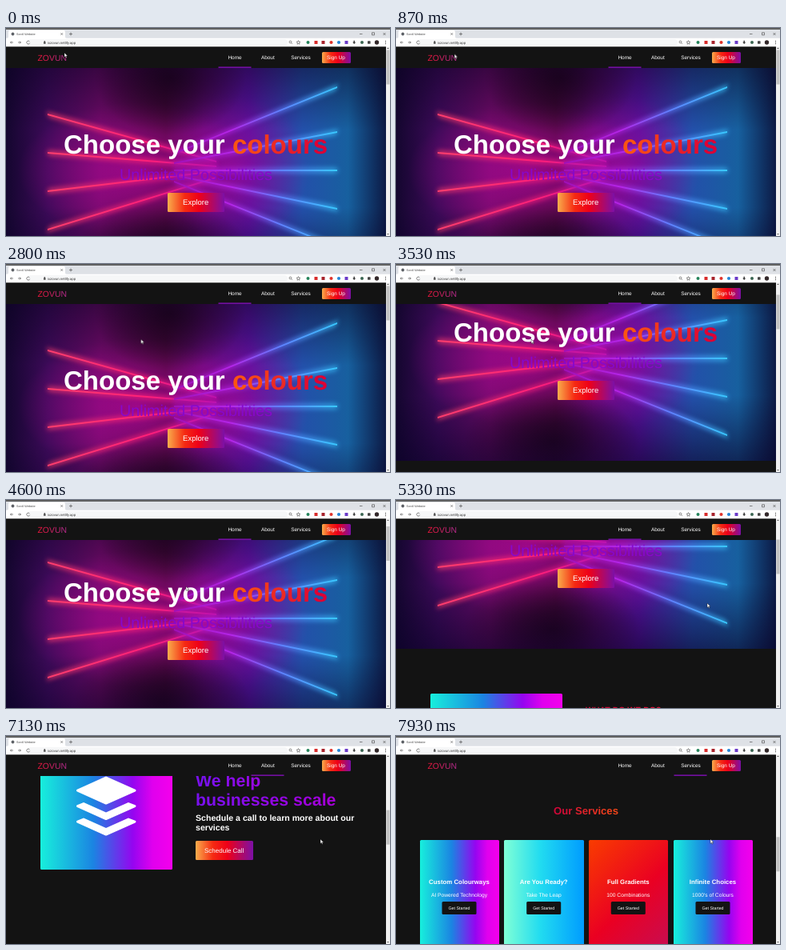
Write an HTML page that moves like this. It is 480 px wide and 260 px high and loops after 8000 ms.

```html
<!DOCTYPE html>
<html lang="en">
<head>
<meta charset="utf-8">
<title>Scroll Website</title>
<style>
  @property --scroll { syntax: "<number>"; inherits: true; initial-value: 0; }
  html, body { margin: 0; width: 100%; height: 100%; overflow: hidden; background: #131313; }
  div, i, svg { position: absolute; display: block; }
  svg { left: 0; top: 0; }
  text { font-family: "Liberation Sans", Arial, sans-serif; fill: #fff; text-rendering: geometricPrecision; }
  .bold { font-weight: 700; }
  .mid { text-anchor: middle; }

  #stage { width: 480px; height: 260px; overflow: hidden; animation: scroll 8s linear infinite; }
  #page { width: 475px; height: 860px; transform: translateY(calc(var(--scroll) * -1px)); }
  #thumb { transform: translateY(calc(var(--scroll) * .183px)); }
  #active { animation: section 8s step-end infinite; }
  #pointer { animation: pointer 8s ease-in-out infinite; }

  #hero {
    top: 50px; width: 475px; height: 256px; overflow: hidden;
    background:
      linear-gradient(#0a022080, #0a022000 30%, #0a022000 68%, #0a022899),
      radial-gradient(95px 72px at 205px 12px, #200318d9, #20031800),
      radial-gradient(110px 66px at 195px 232px, #200318d9, #20031800),
      radial-gradient(95px 90px at 285px 125px, #b4089a7c, #a0089000),
      radial-gradient(150px 85px at 165px 128px, #b4089abf, #a0089000),
      linear-gradient(90deg, #14062f, #3c0a58 11%, #6d0a66 25%, #4a083f 42%, #620b7c 52%,
        #56129f 64%, #2350aa 78%, #17609f 90%, #0c1a45);
  }
  #hero i {
    top: calc(var(--y) * 1px - 50.8px); height: 1.7px; transform-origin: 0 50%;
    transform: skewY(atan2(var(--rise), var(--run)));
  }
  #hero i::before, #hero i::after { content: ""; position: absolute; inset: 0; background: var(--glow); }
  #hero i::before { inset: -2px 0; filter: blur(3px); opacity: .75; }
  .red { --run: 211; left: 52px; width: 211px; --glow: linear-gradient(90deg, #ff3e6c, #ff1f78 60%, #c010a8); }
  .blue { --run: 204; left: 210px; width: 204px; --glow: linear-gradient(90deg, #a010b8, #b425e8 35%, #5f80ff 65%, #38c8ff); }

  .button, .card { border-radius: 1.5px; }
  .button { width: 71.5px; height: 24px; background: linear-gradient(90deg, #f9ad4c, #f52a12 30%, #ee0018 55%, #7c10a6); }
  .card { top: 670px; width: 99.5px; height: 160px; }
  .rainbow { background: linear-gradient(90deg, #17efdc, #1b84e2 40%, #9505f0 70%, #e000ee 85%, #f400ec); }
  .aqua { background: linear-gradient(90deg, #80ffd6, #22dcf0 45%, #009cff); }
  .lava { background: linear-gradient(135deg, #f93c00, #ea0022 50%, #c0105c); }

  @keyframes scroll {
    0%, 36.9% { --scroll: 0; animation-timing-function: ease-in-out; }
    41.6%, 50% { --scroll: 60; animation-timing-function: ease-in-out; }
    53.8%, 59.4% { --scroll: 30; animation-timing-function: ease-in-out; }
    65.6%, 68.8% { --scroll: 120; animation-timing-function: ease-in-out; }
    75%, 80% { --scroll: 210; animation-timing-function: ease-in; }
    86.2% { --scroll: 300; }
    92.5% { --scroll: 420; animation-timing-function: ease-out; }
    98.7%, 100% { --scroll: 540; }
  }
  @keyframes section {
    0% { transform: none; }
    72.5% { transform: translateX(41px); }
    92.5% { transform: translateX(82px); }
  }
  @keyframes pointer {
    0% { transform: translate(73px, 31px); }
    5% { transform: translate(80px, 8px); }
    11.5% { transform: translate(73px, 33px); }
    21.2% { transform: translate(129px, 105px); }
    36%, 50% { transform: translate(169px, 94px); }
    57.5%, 59% { transform: translate(225px, 108px); }
    65.5%, 68% { transform: translate(389px, 129px); }
    76%, 100% { transform: translate(393px, 129px); }
  }
</style>
</head>
<body>
<div id="stage">
  <div id="page">
    <div id="hero">
      <i class="red" style="--y:108;--rise:59"></i>
      <i class="red" style="--y:156;--rise:17"></i>
      <i class="red" style="--y:204;--rise:-25"></i>
      <i class="red" style="--y:252;--rise:-65"></i>
      <i class="blue" style="--y:157;--rise:-83"></i>
      <i class="blue" style="--y:169;--rise:-39"></i>
      <i class="blue" style="--y:178;--rise:0"></i>
      <i class="blue" style="--y:184;--rise:42"></i>
      <i class="blue" style="--y:192;--rise:82"></i>
    </div>
    <div class="button" style="left:201.5px;top:205.5px"></div>
    <div class="rainbow" style="left:43px;top:361.5px;width:165px;height:161px;border-radius:1.5px"></div>
    <div class="button" style="left:237px;top:487px"></div>
    <div class="card rainbow" style="left:29.5px"></div>
    <div class="card aqua" style="left:135.2px"></div>
    <div class="card lava" style="left:240.8px"></div>
    <div class="card rainbow" style="left:346.5px"></div>

    <svg width="475" height="860">
      <defs>
        <g id="start">
          <rect x="-21.500" y="747" width="43" height="16" rx="1.500" fill="#131313"/>
          <text class="mid" y="757" font-size="5.300">Get Started</text>
        </g>
      </defs>
      <g class="bold" font-size="33">
        <text x="72" y="156.500">Choose your</text>
        <text x="282.900" y="156.500" data-fade="251,84,18 222,0,52">colours</text>
      </g>
      <text x="142" y="190" font-size="19.750" style="fill:#8709cb">Unlimited Possibilities</text>
      <text class="mid" x="237.200" y="220.500" font-size="9.500">Explore</text>

      <g fill="#fff" stroke="#fff" stroke-width="3" stroke-linejoin="round">
        <path d="M125 408 161 424 125 440 89.500 424Z"/>
        <path id="sheet" d="M89.500 443.500 97 440.500 125 453 153 440.500 161 443.500 125 459.500Z"/>
        <use href="#sheet" y="19.500"/>
      </g>
      <text class="bold" x="237" y="386" font-size="10.500" data-fade="207,8,56 232,20,60">WHAT DO WE DO?</text>
      <g class="bold" font-size="21.300">
        <text x="237" y="418.500" data-fade="122,16,238 150,8,226">We help</text>
        <text x="237" y="443" data-fade="122,16,238 165,0,216">businesses scale</text>
      </g>
      <g class="bold" font-size="10.600">
        <text x="237" y="462">Schedule a call to learn more about our</text>
        <text x="237" y="474">services</text>
      </g>
      <text class="mid" x="272.700" y="502" font-size="8">Schedule Call</text>

      <text class="bold mid" x="237.500" y="637.700" font-size="13.100" data-fade="207,8,56 244,70,26">Our Services</text>
      <g class="mid bold" font-size="7.850">
        <text x="79" y="724.700">Custom Colourways</text>
        <text x="184.700" y="724.700">Are You Ready?</text>
        <text x="290.300" y="724.700">Full Gradients</text>
        <text x="396" y="724.700">Infinite Choices</text>
      </g>
      <g class="mid" font-size="6.700">
        <text x="79" y="740.500">AI Powered Technology</text>
        <text x="184.700" y="740.500">Take The Leap</text>
        <text x="290.300" y="740.500">100 Combinations</text>
        <text x="396" y="740.500">1000's of Colours</text>
      </g>
      <use href="#start" x="79"/><use href="#start" x="184.700"/>
      <use href="#start" x="290.300"/><use href="#start" x="396"/>
    </svg>
  </div>

  <div style="top:23px;width:475px;height:27px;background:#131313"></div>
  <div class="button" style="left:394.5px;top:29.5px;width:36px;height:14.5px"></div>

  <svg width="480" height="260">
    <!-- site header -->
    <text x="39.500" y="40.500" font-size="10.400" data-fade="232,23,63 180,42,134">ZOVUN</text>
    <g class="mid" font-size="6.450">
      <text x="286" y="38.600">Home</text>
      <text x="327.300" y="38.600">About</text>
      <text x="368.500" y="38.600">Services</text>
      <text x="412.500" y="39">Sign Up</text>
    </g>
    <rect id="active" x="265.500" y="48.500" width="41" height="1.300" fill="#8a0fc4"/>

    <!-- scrollbar -->
    <rect x="475" y="23" width="5" height="237" fill="#f1f1f1"/>
    <path d="M476.200 26 477.500 24.500 478.800 26ZM476.200 257 477.500 258.500 478.800 257Z" fill="#555"/>
    <rect id="thumb" x="475.500" y="27.500" width="4" height="43" fill="#c1c1c1"/>

    <!-- browser frame -->
    <rect width="480" height="13" fill="#dee1e6"/>
    <rect width="480" height="2" fill="#606060"/>
    <path d="M1 13Q3 13 3 11V5Q3 3 5 3H72Q74 3 74 5V11Q74 13 76 13Z" fill="#fff"/>
    <rect y="12.700" width="480" height="10.600" fill="#fff"/>
    <circle cx="8.500" cy="7.500" r="1.900" fill="#5f6368"/>
    <text x="13" y="8.900" font-size="3.700" style="fill:#444">Scroll Website</text>
    <rect x="27" y="14" width="325" height="8" rx="4" fill="#f6f7f8"/>
    <text x="52" y="19.600" font-size="4.300" style="fill:#333">ixzovun.netlify.app</text>
    <g fill="none" stroke="#555" stroke-width=".7">
      <path d="M68.500 6.300l2.400 2.400m0-2.400l-2.400 2.400M79 7.500h4m-2-2v4M442 7.500h3.500M457.500 5.800h3v3h-3zM471.500 6l3 3m0-3l-3 3"/>
      <path d="M9 18H5.500m1.500-1.500L5.500 18 7 19.500M15 18h3.500m-1.500-1.500L18.500 18 17 19.500M29.500 17a2 2 0 1 0 .2 1.800"/>
      <circle cx="355.500" cy="17.500" r="1.400"/><path d="M356.600 18.600l1.200 1.200"/>
      <path d="M365.500 15.700l.7 1.500 1.700.2-1.200 1.100.3 1.700-1.500-.8-1.500.8.3-1.700-1.200-1.100 1.700-.2z"/>
    </g>
    <path d="M47 17.500h2.600v2.300H47zM47.500 17.500v-.8a.8.800 0 0 1 1.600 0v.8" fill="#555"/>
    <circle cx="377.500" cy="18" r="2" fill="#25845b"/>
    <rect x="385.500" y="16" width="4" height="4" fill="#d82c2c"/>
    <rect x="394.500" y="16" width="4" height="4" fill="#a8232c"/>
    <circle cx="406.500" cy="18" r="2.100" fill="#e0342c"/>
    <circle cx="416" cy="18" r="2.100" fill="#2486d8"/>
    <rect x="423.500" y="16" width="4" height="4" fill="#6a3ac8"/>
    <path d="M434.500 15.800h1.400v2h1.300l-2 2.200-2-2.200h1.300z" fill="#333"/>
    <circle cx="445" cy="18" r="2" fill="#3a6552"/>
    <rect x="452" y="16.200" width="3.600" height="3.600" rx=".6" fill="#444"/>
    <circle cx="463.500" cy="18" r="2.700" fill="#33282a"/>
    <path d="M474 15.800h1v1h-1zM474 17.500h1v1h-1zM474 19.200h1v1h-1z" fill="#555"/>

    <path id="pointer" d="M0 0V5.400L1.300 4.200 2.200 6.200 3.100 5.800 2.200 3.900H4Z" fill="#fff" stroke="#111" stroke-width=".4"/>
  </svg>
</div>
<script>
  // Fades the letters of a text from one tone to another.
  for (const label of document.querySelectorAll("[data-fade]")) {
    const [from, to] = label.dataset.fade.split(" ").map(tone => tone.split(",").map(Number));
    const letters = [...label.textContent];
    label.textContent = "";
    letters.forEach((letter, i) => {
      const span = document.createElementNS("http://www.w3.org/2000/svg", "tspan");
      const mix = from.map((v, k) => Math.round(v + (to[k] - v) * i / (letters.length - 1)));
      span.setAttribute("fill", `rgb(${mix})`);
      span.textContent = letter;
      label.append(span);
    });
  }
</script>
</body>
</html>
```
